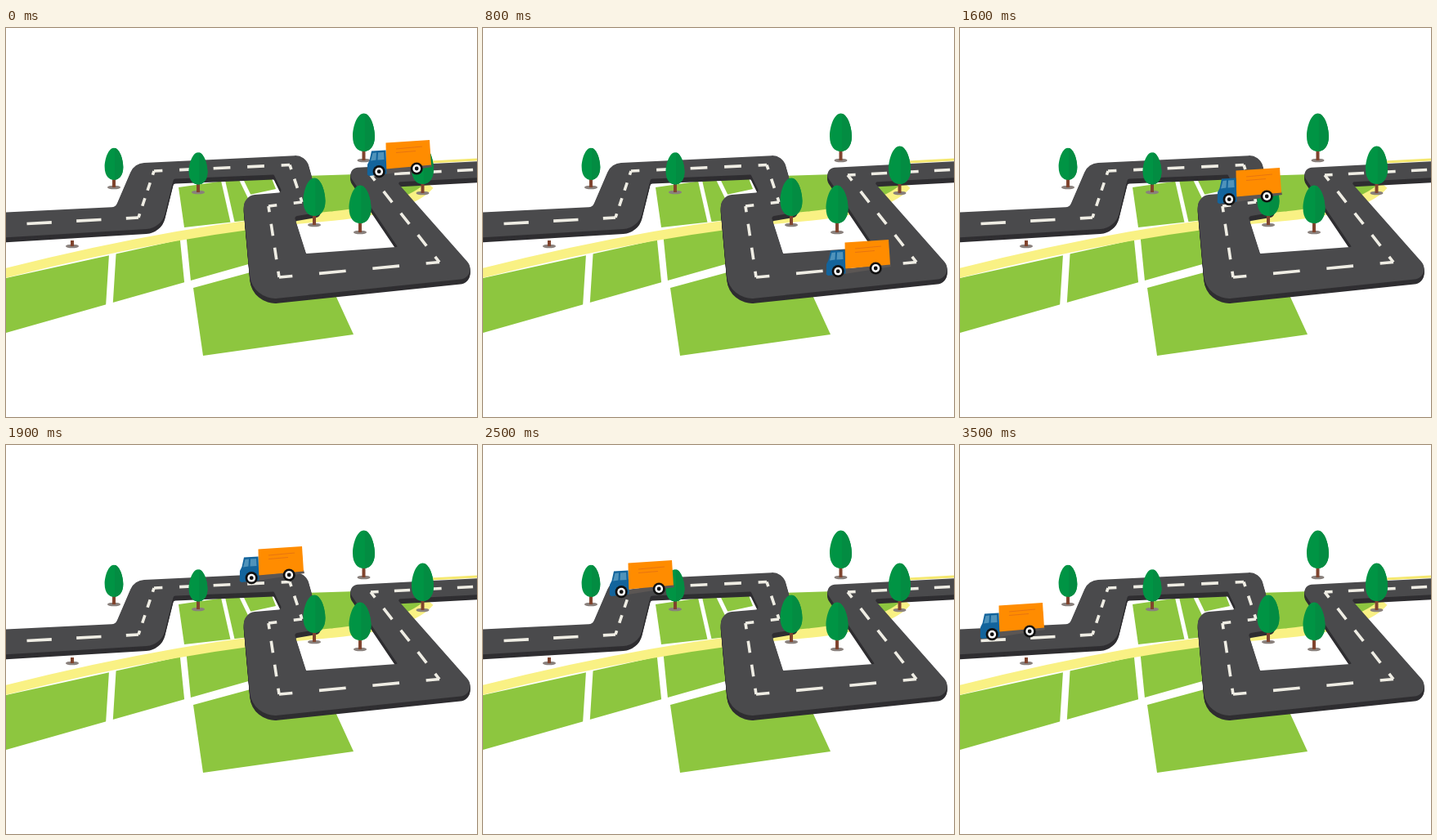
An HTML page with a canvas that plays this animation: 576x476 px, repeating every 3.6 s.

```html
<!DOCTYPE html>
<html lang="en">
<head>
<meta charset="utf-8">
<title>Delivery truck on a winding road</title>
<style>
html, body { margin: 0; width: 100%; height: 100%; overflow: hidden; background: #fff; }
canvas { display: block; }
</style>
</head>
<body>
<canvas id="stage" width="576" height="476"></canvas>
<script>
const W = 576, H = 476, LOOP = 3600, STEP = 100;
const stage = document.getElementById('stage').getContext('2d');
const scenery = document.createElement('canvas');
scenery.width = W;
scenery.height = H;

function poly(c, color, ...pts) {
  c.fillStyle = color;
  c.beginPath();
  for (let i = 0; i < pts.length; i += 2) c.lineTo(pts[i], pts[i + 1]);
  c.fill();
}

function line(c, color, width, x0, y0, x1, y1) {
  c.strokeStyle = color;
  c.lineWidth = width;
  c.beginPath();
  c.moveTo(x0, y0);
  c.lineTo(x1, y1);
  c.stroke();
}

function oval(c, color, x, y, rx, ry = rx) {
  c.fillStyle = color;
  c.beginPath();
  c.ellipse(x, y, rx, ry, 0, 0, Math.PI * 2);
  c.fill();
}

// Turns of the centre line: position, vector to the far edge,
// corner radius of the far and near edge, dashes on the leg that follows.
const turns = [
  { x: -20, y: 242, dx: 0, dy: -15.5, far: 0, near: 0, n: 2 },
  { x: 162, y: 232, dx: -28, dy: -13, far: 8, near: 25, n: 2 },
  { x: 181, y: 175, dx: -24, dy: -9.5, far: 19, near: 3, n: 3 },
  { x: 347, y: 167.5, dx: 19.5, dy: -12, far: 17, near: 1, n: 1 },
  { x: 362, y: 213, dx: 24, dy: 12, far: 6, near: 3, n: 0 },
  { x: 321, y: 218, dx: 31.5, dy: 12.5, far: 3, near: 15, n: 2 },
  { x: 334, y: 305, dx: 33, dy: -29, far: 1, near: 31, n: 2 },
  { x: 530, y: 286.5, dx: -51, dy: -18.5, far: 1, near: 13, n: 3 },
  { x: 446, y: 180, dx: -32, dy: -8.5, far: 9, near: 2, n: 3 },
  { x: 600, y: 172, dx: 0, dy: -10, far: 0, near: 0, n: 0 }
];
const edges = [
  ...turns.map(t => [t.x + t.dx, t.y + t.dy, t.far]),
  ...turns.map(t => [t.x - t.dx, t.y - t.dy, t.near]).reverse()
];

function slab(c, color, drop) {
  c.fillStyle = color;
  c.beginPath();
  edges.forEach(([x, y, r], i) => {
    const [nx, ny] = edges[(i + 1) % edges.length];
    if (r) c.arcTo(x, y + drop, nx, ny + drop, r);
    else c.lineTo(x, y + drop);
  });
  c.fill();
}

function drawRoad(c) {
  for (let d = 6; d > 0; d--) slab(c, '#2f2e31', d);
  slab(c, '#4a4a4c', 0);
  // Each leg starts and ends with half a dash, so the turns read as corners.
  turns.slice(1).forEach((b, i) => {
    const a = turns[i];
    const dash = Math.hypot(b.x - a.x, b.y - a.y) / (2 * a.n + 2);
    c.setLineDash([dash, dash]);
    c.lineDashOffset = dash / 2;
    line(c, '#efede4', 3.6, a.x, a.y, b.x, b.y);
  });
  c.setLineDash([]);
}

function drawFields(c) {
  const green = '#8dc63f';
  poly(c, green, 0, 306, 300, 240, 300, 288, 0, 373);
  line(c, '#fff', 8.5, 131, 265, 126, 345);
  line(c, '#fff', 8, 216, 250, 222.5, 315);
  poly(c, green, 229, 318, 380, 277, 425, 375, 241, 401);
  poly(c, green, 211, 195, 323, 179, 330, 197, 298, 204, 298, 235, 218, 244);
  line(c, '#fff', 5, 264, 180, 278, 242);
  line(c, '#fff', 5, 284, 178, 300, 211);
  poly(c, green, 365, 181, 430, 179, 465, 218, 365, 230);
  poly(c, green, 480, 190, 518, 190, 500, 206, 488, 204);

  c.strokeStyle = '#f9f184';
  c.lineWidth = 11.5;
  c.beginPath();
  c.moveTo(-5, 301);
  c.quadraticCurveTo(215, 245, 400, 230);
  c.quadraticCurveTo(495, 220, 518, 192);
  c.stroke();
  line(c, '#f5e86f', 3, 520, 164, 576, 161);
}

function trunk(c, x, base, h) {
  oval(c, '#89807c', x, base, 8, 2.3);
  c.fillStyle = '#80442e';
  c.fillRect(x - 2, base - h, 4, h);
}

function tree(c, x, base, size) {
  trunk(c, x, base, 15 * size);
  c.save();
  c.translate(x, base - 57.5 * size);
  c.scale(13.5 * size, 46.5 * size);
  c.beginPath();
  c.moveTo(0, 0);
  for (const s of [1, -1]) {
    c.moveTo(0, 0);
    c.bezierCurveTo(s * 0.6, 0, s, 0.35, s, 0.6);
    c.bezierCurveTo(s, 0.88, s * 0.5, 1, 0, 1);
  }
  c.fillStyle = '#009444';
  c.fill();
  c.clip();
  c.fillStyle = '#038c42';
  c.fillRect(0.1, 0, 1, 1);
  c.restore();
}

function drawScenery(c) {
  c.fillStyle = '#fff';
  c.fillRect(0, 0, W, H);
  drawFields(c);
  drawRoad(c);
  trunk(c, 81, 267, 7);
  tree(c, 132, 195, 0.84);
  tree(c, 235, 201, 0.85);
  tree(c, 437.5, 162, 1);
  tree(c, 509.5, 202, 1);
  tree(c, 377, 241, 1);
  tree(c, 433, 250, 1);
}

function wheel(c, x, y) {
  oval(c, '#111', x, y, 7.6);
  oval(c, '#fff', x, y, 4.9);
  oval(c, '#111', x, y, 2.4);
}

function truck(c, x, y) {
  const blue = '#13649c', glass = '#4f93bb';
  c.save();
  c.translate(x, y);
  poly(c, '#5b5654', 22, 37, 79, 30, 80, 34, 23, 43);
  poly(c, '#ff8c00', 23.5, 4.5, 77, 1, 79, 31.5, 24, 36.5);
  line(c, '#e87510', 1.2, 36, 12, 68, 9);
  line(c, '#e87510', 1.2, 36, 16.5, 60, 14.5);
  poly(c, blue, 6, 14.5, 23.5, 13.5, 24.5, 42.5, 3, 45, 0.8, 43.5, 1, 31, 3.5, 26);
  poly(c, glass, 7.5, 17, 12, 16.5, 11.5, 25.5, 5, 26.5);
  poly(c, glass, 14, 16.5, 21, 16, 21.5, 25, 13.5, 25.5);
  wheel(c, 15.2, 39.7);
  wheel(c, 61.2, 36);
  c.restore();
}

// Where the truck changes direction: [time, x, y]
const stops = [
  [0, 441, 136], [600, 466, 253], [1200, 324, 267], [1800, 309, 122],
  [2400, 162, 130], [2900, 124, 179], [3500, 24, 192]
];

function place(t) {
  const i = stops.findIndex(s => s[0] > t);
  const [t1, x1, y1] = stops.at(i);
  const [t0, x0, y0] = stops.at(i < 0 ? -2 : i - 1);
  const k = (t - t0) / (t1 - t0);
  return [Math.round(x0 + (x1 - x0) * k), Math.round(y0 + (y1 - y0) * k)];
}

function draw(now) {
  const t = Math.floor((now % LOOP) / STEP) * STEP;
  stage.drawImage(scenery, 0, 0);
  truck(stage, ...place(t));
}

drawScenery(scenery.getContext('2d'));
const start = performance.now();
function tick() {
  draw(performance.now() - start);
  requestAnimationFrame(tick);
}
tick();
</script>
</body>
</html>
```
